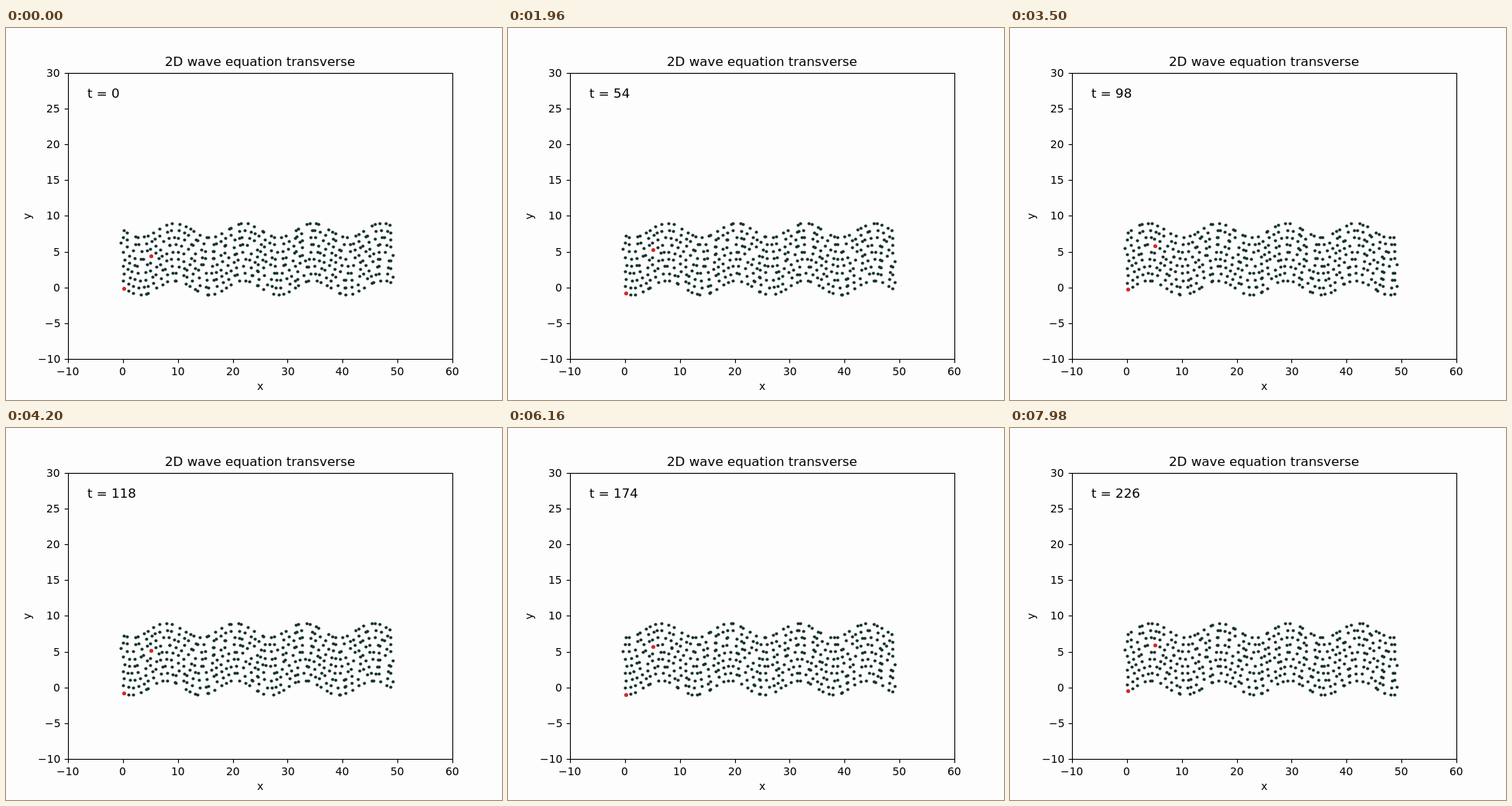
These frames come from a looping animation (640x480 px, 8000 ms). An HTML page with a canvas:

```html
<!DOCTYPE html>
<html lang="en">
<head>
<meta charset="utf-8">
<title>2D wave equation transverse</title>
<style>
html, body { margin: 0; width: 100%; height: 100%; overflow: hidden; background: #fdfdfd; }
canvas { display: block; }
</style>
</head>
<body>
<canvas id="plot" width="640" height="480"></canvas>
<script>
const ctx = document.getElementById('plot').getContext('2d');
const LOOP = 8000, STEP = 70;
const COLS = 50, ROWS = 9;
const SMALL = 13.89, LARGE = 16.67;
const BOX = { left: 80, right: 576, top: 57.6, bottom: 427.2 };
const PAPER = '#fdfdfd', INK = '#000', DOT = '#16352f', MARK = '#d62728';

const toX = x => BOX.left + (x + 10) * (BOX.right - BOX.left) / 70;
const toY = y => BOX.bottom - (y + 10) * (BOX.bottom - BOX.top) / 40;
const snap = v => Math.floor(v + 0.5) + 0.5;

function makeRandom(seed) {
  return () => {
    seed = (seed + 0x6D2B79F5) | 0;
    let r = Math.imul(seed ^ (seed >>> 15), 1 | seed);
    r = (r + Math.imul(r ^ (r >>> 7), 61 | r)) ^ r;
    return ((r ^ (r >>> 14)) >>> 0) / 4294967296;
  };
}

// A grid of particles, each shifted sideways by up to half a cell.
function makePoints() {
  const random = makeRandom(11);
  const points = [];
  for (let i = 0; i < COLS; i++) {
    for (let j = 0; j < ROWS; j++) {
      points.push({ x: i + random() - 0.5, y: j });
    }
  }
  return points;
}

const points = makePoints();
const marked = [points[0], points[5 * ROWS + 5]];
marked[0].x = 0.2;
marked[1].x = 5.1;

// Places text on whole pixels; anchor is 0 for left, 0.5 for centre, 1 for right.
function text(str, x, y, size, anchor) {
  ctx.font = size + 'px "DejaVu Sans", sans-serif';
  const width = ctx.measureText(str).width;
  ctx.fillText(str, Math.round(x - width * anchor), Math.round(y));
}

function line(x1, y1, x2, y2) {
  ctx.beginPath();
  ctx.moveTo(x1, y1);
  ctx.lineTo(x2, y2);
  ctx.stroke();
}

function drawDot(p, t, radius) {
  const y = p.y + Math.sin(0.1 * t - 0.5 * p.x);
  ctx.beginPath();
  ctx.arc(snap(toX(p.x)), snap(toY(y)), radius, 0, 2 * Math.PI);
  ctx.fill();
}

const label = v => (v < 0 ? '\u2212' : '') + Math.abs(v);

function drawAxes() {
  const left = snap(BOX.left), right = snap(BOX.right);
  const top = snap(BOX.top), bottom = snap(BOX.bottom);
  const middle = (BOX.left + BOX.right) / 2;
  ctx.strokeStyle = ctx.fillStyle = INK;
  ctx.lineWidth = 1.11;
  for (let v = -10; v <= 60; v += 10) {
    const x = snap(toX(v));
    line(x, bottom, x, bottom + 4.86);
    text(label(v), toX(v), 448, SMALL, 0.5);
  }
  for (let v = -10; v <= 30; v += 5) {
    const y = snap(toY(v));
    line(left, y, left - 4.86, y);
    text(label(v), 70, y + 4.5, SMALL, 1);
  }
  ctx.strokeRect(left, top, right - left, bottom - top);
  text('x', middle, 467, SMALL, 0.5);
  ctx.save();
  ctx.translate(32, 243);
  ctx.rotate(-Math.PI / 2);
  text('y', 0, 0, SMALL, 0.5);
  ctx.restore();
  text('2D wave equation transverse', middle, 49, LARGE, 0.5);
}

function draw(ms) {
  // The first state is held for two steps.
  const t = Math.max(0, 2 * (Math.floor(ms / STEP) - 1));
  ctx.fillStyle = PAPER;
  ctx.fillRect(0, 0, 640, 480);
  ctx.fillStyle = DOT;
  for (const p of points) drawDot(p, t, 2.05);
  ctx.fillStyle = MARK;
  for (const p of marked) drawDot(p, t, 2.5);
  drawAxes();
  text('t = ' + t, 105, 90, LARGE, 0);
}

const start = performance.now();
function tick() {
  draw((performance.now() - start) % LOOP);
  requestAnimationFrame(tick);
}
tick();
</script>
</body>
</html>
```
